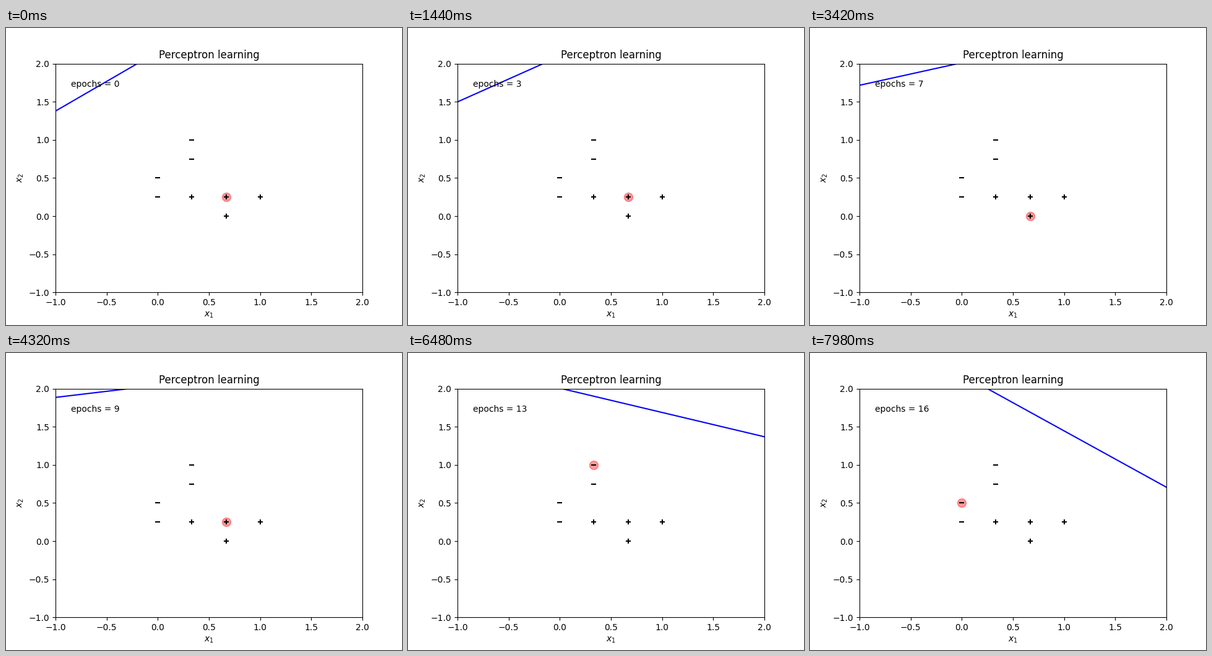
A matplotlib script that plays this animation: 640 by 480 pixels, repeating every 8 s.

```python
import numpy as np
import matplotlib.pyplot as plt
from matplotlib.animation import FuncAnimation

STEP_MS, TICK_MS, LOOP_MS = 60, 20, 8000
STEPS = -(-LOOP_MS // STEP_MS)

# Samples in training order: four positives, then four negatives.
POS = np.array([(2, 1), (2, 0), (3, 1), (1, 1)]) / (3, 4)
NEG = np.array([(1, 4), (0, 2), (1, 3), (0, 1)]) / (3, 4)
POINTS = np.vstack([POS, NEG])
INPUTS = np.column_stack([np.ones(len(POINTS)), POINTS])
TARGETS = np.repeat([1.0, 0.0], [len(POS), len(NEG)])

# The decision line at the start, middle and end: step and two points on it.
KEY_LINES = [
    (0, (-1, 1.378), (-0.2, 2)),
    (72, (-1, 1.885), (-0.285, 2)),
    (STEPS - 1, (0.25, 2), (2, 0.707)),
]


def train(params):
    """Weights (bias, w1, w2) after each step of sigmoid learning."""
    w, rate = np.array(params[:3], float), params[3]
    history = []
    for i in range(STEPS):
        x, t = INPUTS[i % len(INPUTS)], TARGETS[i % len(INPUTS)]
        out = 1 / (1 + np.exp(-np.clip(w @ x, -50, 50)))
        w = w + rate * (t - out) * out * (1 - out) * x
        history.append(w)
    return np.array(history)


def line_y(w, x):
    return -(w[0] + w[1] * x) / w[2]


def misfit(params):
    history = train(params)
    return np.array([line_y(history[step], x) - y
                     for step, *points in KEY_LINES for x, y in points])


def calibrate(params, rounds=40, h=1e-5):
    """Damped least squares for the start weights and learning rate."""
    p, damp = np.array(params, float), 1e-3
    res = misfit(p)
    for _ in range(rounds):
        jac = np.column_stack([(misfit(p + h * e) - res) / h for e in np.eye(len(p))])
        hess = jac.T @ jac
        trial = p - np.linalg.solve(hess + damp * np.diag(np.diag(hess)), jac.T @ res)
        new = misfit(trial)
        if new @ new < res @ res:
            p, res, damp = trial, new, damp / 4
        else:
            damp *= 5
    return p


weights = train(calibrate((-0.95, -0.35, 0.42, 0.095)))

fig, ax = plt.subplots(figsize=(6.4, 4.8), dpi=100)
ax.set(xlim=(-1, 2), ylim=(-1, 2), title="Perceptron learning",
       xlabel="$x_1$", ylabel="$x_2$")

current, = ax.plot([], [], "o", color="red", markersize=10, alpha=0.4, zorder=0.9)
ax.scatter(*POS.T, marker="+", color="black")
ax.scatter(*NEG.T, marker="_", color="black")
ends = np.array([-1.0, 2.0])
line, = ax.plot([], [], color="blue")
label = ax.text(-0.85, 1.7, "")


def update(n):
    step = n * TICK_MS // STEP_MS
    epoch, sample = divmod(step, len(POINTS))
    line.set_data(ends, line_y(weights[step], ends))
    current.set_data(*POINTS[sample:sample + 1].T)
    label.set_text(f"epochs = {epoch}")
    return line, current, label


anim = FuncAnimation(fig, update, frames=LOOP_MS // TICK_MS, interval=TICK_MS,
                     init_func=lambda: update(0), repeat=True, repeat_delay=0)
plt.show()
```
